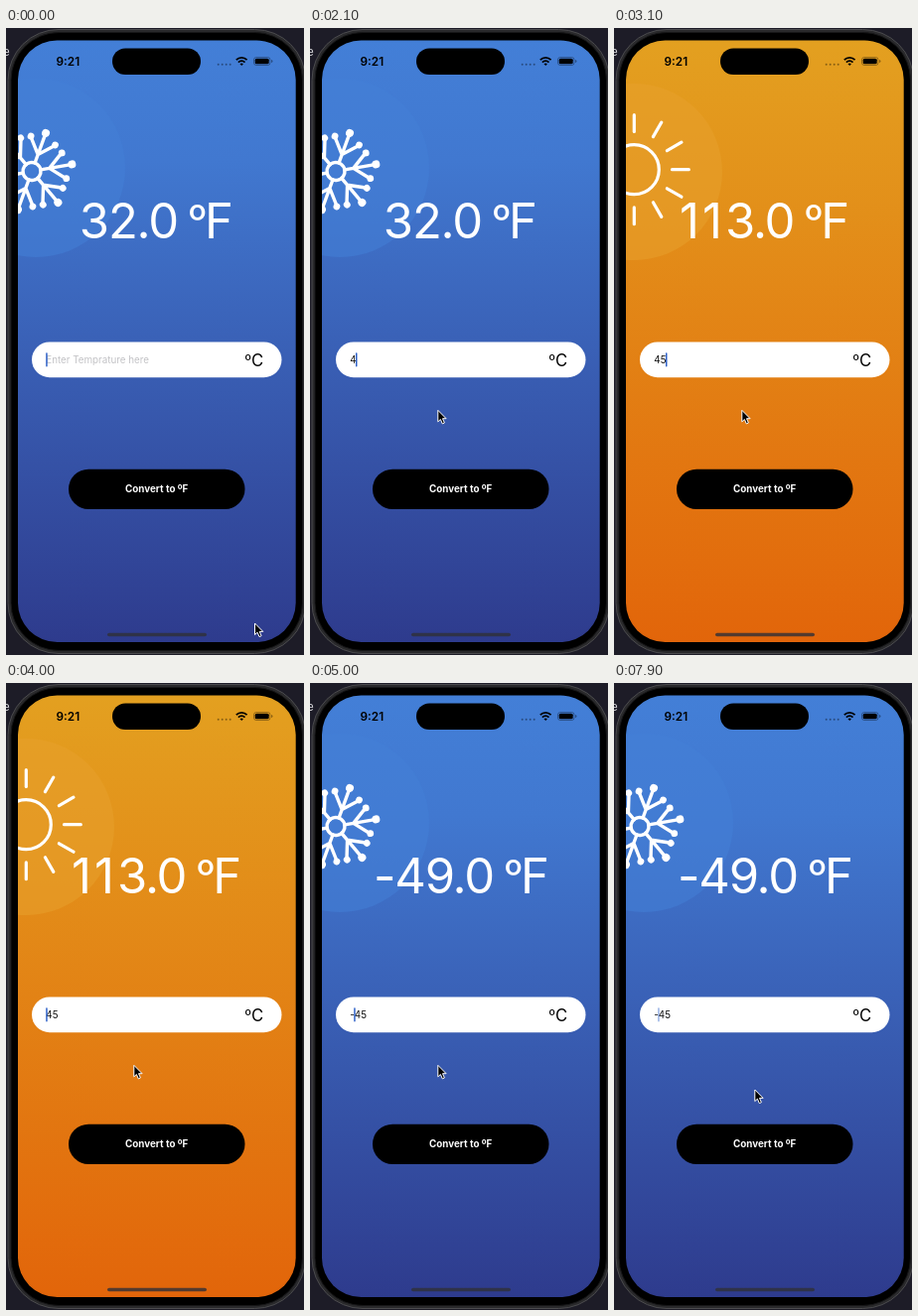
Write an HTML page that moves like this. It is 300 px wide and 632 px high and loops after 8000 ms.

```html
<!DOCTYPE html>
<html lang="en">
<head>
<meta charset="utf-8">
<title>Temperature converter</title>
<style>
  html, body { margin: 0; width: 100%; height: 100%; overflow: hidden; background: #1d1c27; }
  svg { display: block; width: 100vw; height: 100vh; }
  text { font-family: Inter, Roboto, sans-serif; white-space: pre; }
  .big { font-size: 49px; fill: #fff; letter-spacing: -1.2px; }
  .big .one { letter-spacing: 3px; }
  .degree { font-size: 37px; font-weight: 500; fill: #fff; }
  .field { font-size: 9.8px; }
</style>
</head>
<body>
<svg viewBox="0 0 300 632">
  <defs>
    <linearGradient id="coldSky" x1="0" y1="0" x2="0" y2="1">
      <stop offset="0" stop-color="#437fd7"/>
      <stop offset=".2" stop-color="#4178d0"/>
      <stop offset="1" stop-color="#2e3b8d"/>
    </linearGradient>
    <linearGradient id="warmSky" x1="0" y1="0" x2="0" y2="1">
      <stop offset="0" stop-color="#e3a020"/>
      <stop offset="1" stop-color="#e2650a"/>
    </linearGradient>
    <clipPath id="screen"><rect x="12" y="12.5" width="279.7" height="606.5" rx="39.5"/></clipPath>
  </defs>

  <rect width="300" height="632" fill="#1d1c27"/>
  <text x="-2.8" y="27.6" font-size="11" fill="#d8d8dc">e</text>

  <!-- phone body -->
  <rect x="2" y="1.5" width="299.5" height="629" rx="51" fill="#29292b" stroke="#4b4b4e"/>
  <rect x="5" y="4.5" width="293.5" height="623" rx="48" fill="#000" stroke="#171718"/>

  <g clip-path="url(#screen)">
    <g id="cold">
      <rect x="12" y="12" width="280" height="608" fill="url(#coldSky)"/>
      <circle cx="30" cy="141" r="90" fill="#4480d8" opacity=".55"/>
      <g id="flake" transform="translate(26 144.5) rotate(-10)" fill="#fff" stroke="#fff" stroke-width="3.4" stroke-linecap="round">
        <circle r="9" fill="none"/>
      </g>
    </g>
    <g id="warm">
      <rect x="12" y="12" width="280" height="608" fill="url(#warmSky)"/>
      <circle cx="20" cy="145" r="89" fill="#e7a12d" opacity=".55"/>
      <g id="sun" transform="translate(20.3 142.7)" fill="none" stroke="#fff" stroke-width="3.2" stroke-linecap="round">
        <circle r="25"/>
      </g>
    </g>
  </g>

  <!-- status bar -->
  <rect x="107" y="20.5" width="89" height="26.5" rx="13.2"/>
  <text x="50.5" y="37.6" font-size="11.8" font-weight="600">9:21</text>
  <path d="M213.7 36.8h12.2" stroke="#000" stroke-opacity=".4" stroke-width="2" stroke-linecap="round" stroke-dasharray="0 4"/>
  <g fill="none" stroke="#000" stroke-width="1.7">
    <path d="M231.8 32.2a7.6 7.6 0 0 1 10.8 0"/>
    <path d="M233.9 34.6a4.6 4.6 0 0 1 6.6 0"/>
  </g>
  <path d="M237.2 38.1l-1.7-1.8a2.4 2.4 0 0 1 3.4 0z"/>
  <rect x="249.5" y="29.5" width="16.5" height="8" rx="2.5" fill="none" stroke="#000" stroke-opacity=".4" stroke-width=".8"/>
  <rect x="250.7" y="30.7" width="14" height="5.6" rx="1.5"/>
  <path d="M267.2 32v3q1.2-.4 1.2-1.5t-1.2-1.5" fill-opacity=".45"/>

  <text id="number" class="big" y="212" text-anchor="end"></text>
  <g id="unit">
    <text class="degree" x="10.8" y="204.5">º</text>
    <text class="big" x="27" y="212">F</text>
  </g>

  <rect x="26" y="316.5" width="251.5" height="35.7" rx="17.85" fill="#fff"/>
  <text id="entry" class="field" x="40.3" y="338.2"></text>
  <text x="240.5" y="338.6" font-size="13">º</text>
  <text x="247.1" y="341" font-size="16.7">C</text>
  <rect id="caret" y="327.3" width="1.5" height="14.2" rx=".7" fill="#2f62c9"/>

  <rect x="63" y="444.7" width="177.5" height="40.3" rx="20.1"/>
  <text x="151.7" y="468.3" font-size="9.8" font-weight="700" fill="#fff" text-anchor="middle">Convert to ºF</text>

  <rect x="102" y="609.7" width="100" height="3.6" rx="1.8" fill="#303038" opacity=".8"/>

  <path id="mouse" d="M0 0V11.6L2.6 9.2L4.5 13.6L6.6 12.7L4.7 8.4H8.3Z" stroke="#fff" stroke-width="1" stroke-linejoin="round"/>
</svg>
<script>
const LOOP = 8000;
const $ = id => document.getElementById(id);

// A step keeps its values until the next one starts.
const entries = [
  { at: 0, text: '', caret: 40.2 },
  { at: 2100, text: '4', caret: 46 },
  { at: 3100, text: '45', caret: 52 },
  { at: 4000, text: '45', caret: 40.2 },
  { at: 5000, text: '-45', caret: 44.2 }
];
const results = [
  { at: 0, text: '32.0', end: 173, cold: true },
  { at: 2200, text: '39.2', end: 173, cold: false },
  { at: 3100, text: '113.0', end: 181.3, cold: false },
  { at: 5000, text: '-49.0', end: 185, cold: true }
];
const moves = [
  { from: 200, to: 1500, a: [250.5, 600], b: [128.8, 385.3] },
  { from: 7200, to: 7800, a: [128.8, 385.3], b: [141.8, 410] }
];

const clamp = v => Math.min(1, Math.max(0, v));
const ease = v => v * v * (3 - 2 * v);
const current = (steps, t) => steps.filter(s => s.at <= t).pop();

function spokes(count, markup) {
  return Array.from({ length: count }, (_, i) =>
    `<g transform="rotate(${i * 360 / count})">${markup}</g>`).join('');
}

$('flake').innerHTML += spokes(6, `
  <path d="M9 0H40M18 0L32 -12.5M18 0L32 12.5" fill="none"/>
  <g stroke="none">
    <circle cx="41" r="4"/><circle cx="33" cy="-13" r="3.4"/><circle cx="33" cy="13" r="3.4"/>
  </g>`);
$('sun').innerHTML += spokes(12, '<path d="M38.2 0H55"/>');

// Solid, fade out, hidden, fade in; restarts with every edit.
function blink(age) {
  const p = age % 1000;
  return p < 800 ? 1 - clamp((p - 500) / 200) : (p - 800) / 200;
}

function mouseAt(t) {
  const m = moves.filter(m => m.from <= t).pop() || moves[0];
  const k = ease(clamp((t - m.from) / (m.to - m.from)));
  return m.a.map((v, i) => v + (m.b[i] - v) * k);
}

function render(t) {
  const entry = current(entries, t);
  const result = current(results, t);

  $('entry').textContent = entry.text || 'Enter Temprature here';
  $('entry').setAttribute('fill', entry.text ? '#111' : '#c3c3c6');
  $('caret').setAttribute('x', entry.caret);
  $('caret').setAttribute('opacity', blink(t - entry.at));

  // The narrow digit gets wider spacing.
  $('number').innerHTML = result.text.replace(/1+/g, '<tspan class="one">$&</tspan>');
  $('number').setAttribute('x', result.end);
  $('unit').setAttribute('transform', `translate(${result.end} 0)`);
  $('cold').setAttribute('display', result.cold ? 'inline' : 'none');
  $('warm').setAttribute('display', result.cold ? 'none' : 'inline');

  $('mouse').setAttribute('transform', `translate(${mouseAt(t)})`);
}

const start = performance.now();
function tick() {
  render((performance.now() - start) % LOOP);
  requestAnimationFrame(tick);
}
tick();
</script>
</body>
</html>
```
